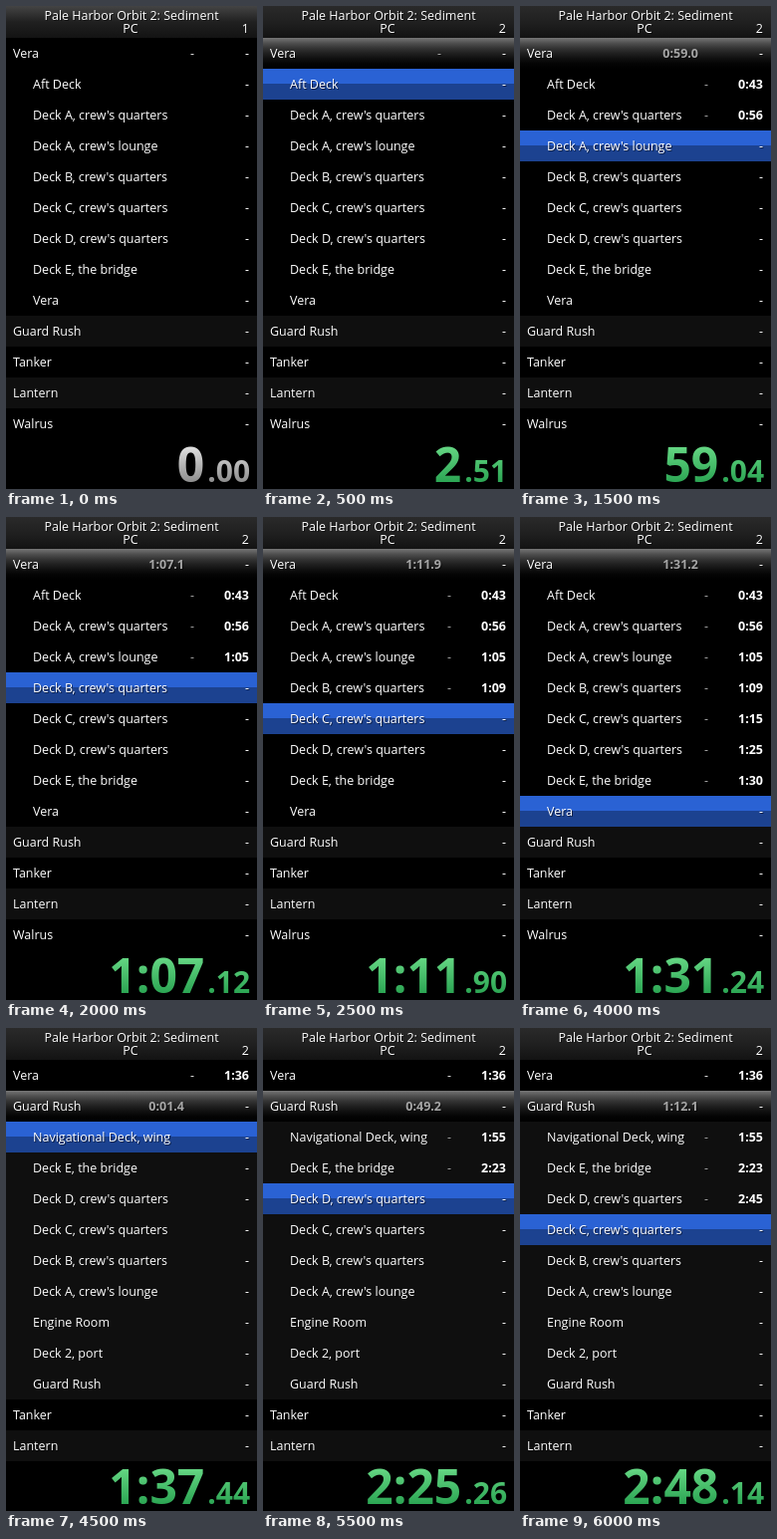
An HTML page with a canvas for the animation above (8 s loop, 252x485 px).

```html
<!DOCTYPE html>
<html lang="en">
<head>
<meta charset="utf-8">
<title>Split timer</title>
<style>
html, body { margin: 0; width: 100%; height: 100%; overflow: hidden; background: #000; }
canvas { display: block; }
</style>
</head>
<body>
<canvas id="stage" width="252" height="485"></canvas>
<script>
const ctx = document.getElementById('stage').getContext('2d');
const W = 252, H = 485, TOP = 32, ROW = 31, BASE = 20;
const LOOP = 8000, STEP = 500;
const FAMILY = '"Open Sans", "Noto Sans", sans-serif';
const PLAIN = '500 12.5px ' + FAMILY, BOLD = 'bold 12.5px ' + FAMILY;
const DIM = '#a6a6a6';

// Clock readings in hundredths, one per step.
const CLOCK = [0, 251, 4580, 5904, 6712, 7190, 7836, 8667, 9124, 9744, 11730, 14526, 16814];

const SECTIONS = [
  {
    name: 'Vera', first: 1, start: 0, end: 96,
    subs: ['Aft Deck', "Deck A, crew's quarters", "Deck A, crew's lounge", "Deck B, crew's quarters",
      "Deck C, crew's quarters", "Deck D, crew's quarters", 'Deck E, the bridge', 'Vera'],
    splits: [43, 56, 65, 69, 75, 85, 90]
  },
  {
    name: 'Guard Rush', first: 9, start: 9600,
    subs: ['Navigational Deck, wing', 'Deck E, the bridge', "Deck D, crew's quarters", "Deck C, crew's quarters",
      "Deck B, crew's quarters", "Deck A, crew's lounge", 'Engine Room', 'Deck 2, port', 'Guard Rush'],
    splits: [115, 143, 165]
  },
  { name: 'Tanker' }, { name: 'Lantern' }, { name: 'Walrus' }
];

const pad = n => String(n).padStart(2, '0');
const minSec = s => Math.floor(s / 60) + ':' + pad(s % 60);

function text(str, x, y, align = 'left', color = '#fff', font = PLAIN) {
  ctx.font = font;
  ctx.textAlign = align;
  ctx.fillStyle = 'rgba(0,0,0,.5)';
  ctx.fillText(str, x + 1, y + 1);
  ctx.fillStyle = color;
  ctx.fillText(str, x, y);
}

function shade(y, h, ...colors) {
  const g = ctx.createLinearGradient(0, y, 0, y + h);
  colors.forEach((c, i) => g.addColorStop(i / (colors.length - 1), c));
  return g;
}

function band(y, h, fill) {
  ctx.fillStyle = fill;
  ctx.fillRect(0, y, W, h);
}

function header(step) {
  band(0, TOP, shade(0, TOP, step ? '#2a2a2a' : '#444', '#202020', '#131313'));
  text('Pale Harbor Orbit 2: Sediment', W / 2, 14, 'center');
  text('PC', 125, 27, 'center');
  text(step ? '2' : '1', 244, 27, 'right');
}

function sectionBar(y) {
  band(y, ROW, shade(y, ROW, '#767676', '#505050', '#343434', '#202020', '#101010', '#040404', '#000'));
}

function currentBar(y) {
  band(y, ROW, '#1c4290');
  band(y, 15, '#2a62d4');
}

function splitRow(y, name, x, time, dashColor) {
  text(name, x, y + BASE);
  if (dashColor) text('-', 189, y + BASE, 'right', dashColor);
  if (time) text(minSec(time), 244, y + BASE, 'right', '#fff', BOLD);
  else text('-', 244, y + BASE, 'right');
}

function sectionTime(y, step, sec) {
  const t = Math.floor((CLOCK[step] - sec.start) / 10);
  const label = step === 1 ? '-' : minSec(Math.floor(t / 10)) + '.' + t % 10;
  text(label, 179, y + BASE, 'right', DIM, step === 1 ? PLAIN : BOLD);
}

function splits(step) {
  const open = step < 9 ? 0 : 1;
  let y = TOP;
  SECTIONS.forEach((sec, i) => {
    if (y >= 435) return;
    const base = i % 2 ? '#0f0f0f' : '#000';
    const active = i === open && step > 0;
    const done = i < open;
    if (active) sectionBar(y);
    else band(y, ROW, base);
    splitRow(y, sec.name, 7, done && sec.end, done || (!step && i === 0) ? '#e0e0e0' : '');
    if (active) sectionTime(y, step, sec);
    y += ROW;
    if (i !== open) return;
    const current = step ? step - sec.first : -1;
    sec.subs.forEach((name, k) => {
      if (k === current) currentBar(y);
      else band(y, ROW, base);
      const passed = k < current;
      splitRow(y, name, 27, passed && sec.splits[k], passed ? DIM : '');
      y += ROW;
    });
  });
}

function clock(step) {
  const cs = CLOCK[step], s = Math.floor(cs / 100);
  const big = s < 60 ? String(s) : minSec(s), small = '.' + pad(cs % 100);
  ctx.fillStyle = step ? shade(444, 35, '#62d481', '#2aa452') : shade(444, 35, '#dcdcdc', '#8c8c8c');
  ctx.textAlign = 'right';
  ctx.font = 'bold 30px ' + FAMILY;
  ctx.fillText(small, 245, 478);
  const left = 245 - ctx.measureText(small).width;
  ctx.font = 'bold 48px ' + FAMILY;
  ctx.fillText(big, left - 3, 478);
}

function draw(now) {
  const step = Math.min(Math.floor(now % LOOP / STEP), CLOCK.length - 1);
  band(0, H, '#000');
  header(step);
  splits(step);
  clock(step);
}

const began = performance.now();
function tick() {
  draw(performance.now() - began);
  requestAnimationFrame(tick);
}
tick();
</script>
</body>
</html>
```
